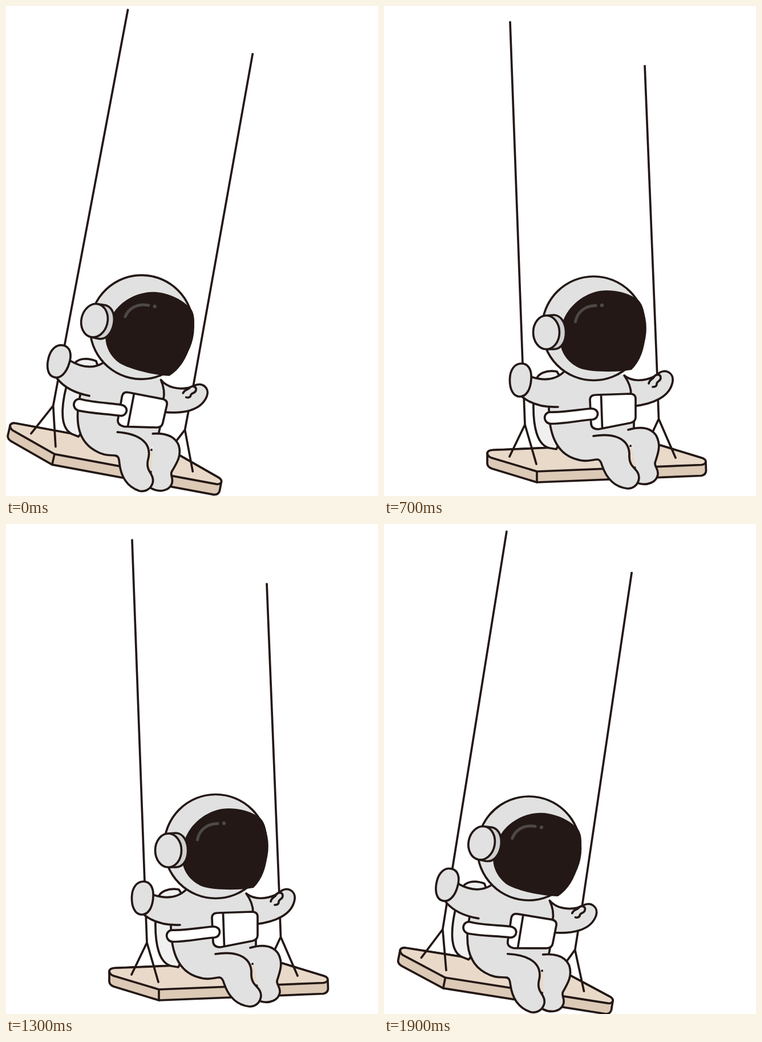
Write an HTML page that moves like this. It is 652x858 px and loops after 2000 ms.

```html
<!DOCTYPE html>
<html lang="en">
<head>
<meta charset="utf-8">
<title>Astronaut on a swing</title>
<style>
  html, body { margin: 0; width: 100%; height: 100%; overflow: hidden; background: #fff; }
  svg { display: block; width: 100%; height: 100%; }
  .ink { fill: none; stroke: #231815; stroke-width: 3.7; stroke-linecap: round; stroke-linejoin: round; }
  .suit { fill: #e1e1e1; }
  .white { fill: #fff; }
  .bare { stroke: none; }
</style>
</head>
<body>
<svg viewBox="0 0 652 858">
  <g class="ink">
    <line id="rope" stroke-linecap="butt"/>
    <g id="swing">
      <!-- seat -->
      <path fill="#dcc9b6" d="M181 783Q182 778 190 777.5L300 773L484 769L556 791Q564 793 564 800L564.5 814Q564 821 556 822.5L268 834L189 810Q181 807 181 801Z"/>
      <path fill="#e9d9c9" d="M181 783Q182 778 190 777.5L300 773L484 769L556 791Q564 793 564 798Q563 803 556 803.5L268 815L188 791Q182 789 181 783Z"/>
      <path d="M268 815V834"/>

      <!-- ropes -->
      <path d="M221 28L243.5 640L247 733L220 789M247 733L267 802"/>
      <path d="M479 655L481.5 723L468 752M481.5 723L511 791"/>

      <!-- backpack -->
      <path fill="#f0f0f0" d="M266 656C269 643 285 637 303 640L340 700L302 776L290 774C268 769 261 735 262 695"/>

      <!-- body -->
      <path class="suit" d="M421 647C435 658 455 657 471 650L479 645C492 633 508 642 506 657C502 684 472 697 436 701"/>
      <path class="suit" d="M464 661C466 653 470 655 473 650C477 643 485 645 485 651C485 658 478 656 478 662C478 666 474 667 471 667"/>
      <path class="suit bare" d="M313 643L421 645C430 660 433 672 433 682L438 742L425 790L374 794C365 794 355 800 335 793C300 782 289 745 289 703V690Z"/>
      <path d="M421 647C429 658 433 670 433 680M438 728V741"/>
      <path class="suit" d="M428 742C452 735 468 739 477 752C487 770 479 786 475 800C474 807 481 810 480 820C478 834 462 840 447 836"/>
      <path class="suit" d="M367 753C400 748 428 755 430 783C430 790 429 795 433 802C437 810 447 814 447 826C446 840 435 845 427 845C400 842 388 822 382 804C380 797 378 794 374 794"/>
      <path d="M289 703C289 745 300 782 335 793C355 800 365 794 374 794"/>
      <path class="suit bare" d="M250 648C275 655 298 657 315 641L330 702H305C280 703 258 697 243 685Z"/>
      <path d="M257 649C275 655 298 657 315 641M243 685C258 697 280 703 305 702"/>
      <path class="suit" d="M241 626C253 626 259 637 258 653C257 672 249 684 238 684C226 684 220 670 220.500 653C221 637 229 626 241 626Z"/>

      <!-- chest pack and hose -->
      <path class="white" d="M371 681L431 679Q441 679 441 688V720Q441 728 432 730L376 741Q364 741 363 732L361 690Q361 681 371 681ZM380.500 681L382.500 739"/>
      <path class="white" d="M292 711C315 712 345 706 362 705C378 704 378 722 366 724C340 726 320 731 293 731.500C278 731 278 711 292 711Z"/>

      <!-- helmet -->
      <ellipse class="suit" cx="367.500" cy="564.500" rx="90.500" ry="91"/>
      <path fill="#231815" stroke="none" d="M312 570C308 540 345 498 390 498C412 498 431 504 446 515C456 525 459 545 458 575C457 600 449 622 434 637C405 642 365 641 345 635C322 626 309 605 309 588Z"/>
      <path stroke="#4d4948" stroke-width="5" style="stroke:#4d4948;stroke-width:5" d="M335.500 553C338 538 350 525 371 524.500"/>
      <circle class="bare" fill="#4d4948" cx="382" cy="524" r="3.200"/>
      <path fill="#cfcfcf" d="M285 542L298 541C325 543 326 600 298 601H285Z"/>
      <ellipse class="suit" cx="284.500" cy="571.500" rx="23" ry="29.500"/>
    </g>
  </g>
</svg>
<script>
  const STEP = 100, HALF = 10;
  const HAND = [243, 627], GRIP = [236, 23];
  const swing = document.getElementById('swing');
  const rope = document.getElementById('rope');

  // step, tilt, left hand x y, top of the right rope x y
  const poses = [
    [0, 12.8, 102.3, 595.7, 432.5, 82.5],
    [1, 11.25, 119.6, 605, 434.3, 84],
    [3, 7.9, 153, 614.5, 440.3, 83],
    [5, 4.1, 195, 618.8, 446, 97.5],
    [7, 0, 243, 627, 457, 103.5],
    [9, -4.4, 287.3, 626.3, 460, 91.5],
    [10, -6.65, 309, 623.5, 461, 86]
  ];

  function poseAt(step) {
    const i = Math.max(1, poses.findIndex(p => p[0] >= step));
    const a = poses[i - 1], b = poses[i];
    const k = (step - a[0]) / (b[0] - a[0]);
    return a.map((v, n) => v + (b[n] - v) * k);
  }

  function draw(time) {
    const tick = Math.floor(time / STEP) % (2 * HALF);
    const [, tilt, x, y, topX, topY] = poseAt(HALF - Math.abs(HALF - tick));
    swing.setAttribute('transform',
      `translate(${x} ${y}) rotate(${tilt}) translate(${-HAND[0]} ${-HAND[1]})`);

    const r = tilt * Math.PI / 180, c = Math.cos(r), s = Math.sin(r);
    rope.setAttribute('x1', topX);
    rope.setAttribute('y1', topY);
    rope.setAttribute('x2', x + GRIP[0] * c - GRIP[1] * s);
    rope.setAttribute('y2', y + GRIP[0] * s + GRIP[1] * c);
  }

  const start = performance.now();
  function loop() {
    draw(performance.now() - start);
    requestAnimationFrame(loop);
  }
  loop();
</script>
</body>
</html>
```
